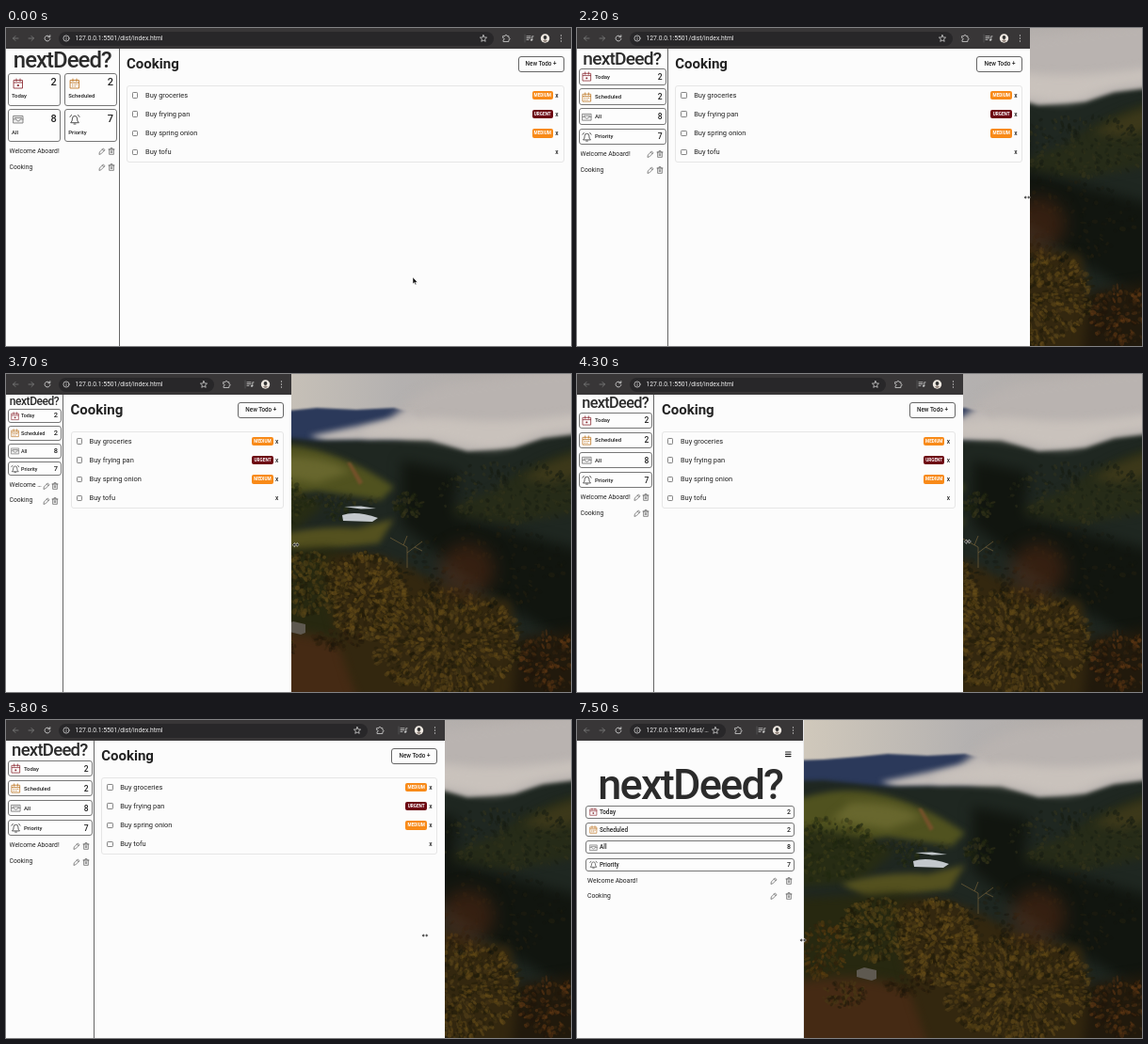
Animation, 600 px wide and 338 px high, one loop 7600 ms. Source, as an HTML page with a canvas:

```html
<!DOCTYPE html>
<html lang="en">
<head>
<meta charset="utf-8">
<title>Todo layout resize</title>
<style>
html, body { margin: 0; width: 100%; height: 100%; overflow: hidden; background: #15180f; }
#stage { position: relative; width: 600px; height: 338px; overflow: hidden; font-family: Roboto, "Liberation Sans", sans-serif; color: #222; }
#stage * { box-sizing: border-box; }
#wall, #win, #bar, #side, #main { position: absolute; left: 0; top: 0; }
svg { display: block; fill: none; stroke: currentColor; stroke-linecap: round; stroke-linejoin: round; overflow: visible; }

#win { width: var(--w); height: 338px; overflow: hidden; background: #fcfcfc; }
#gap { position: absolute; top: 0; left: var(--w); height: 338px; background: #e9e9ea; }
#bar { width: 100%; height: 22px; background: #383637; color: #d0d0d0; }
#bar svg { position: absolute; top: 0; }
#pill { position: absolute; left: 56px; right: 82px; top: 4px; height: 14.5px; border-radius: 8px; background: #282729; }
#url { position: absolute; left: 17.5px; right: 18px; top: 0; font: 6.75px/14px Roboto, sans-serif; color: #eee; }
.cut { white-space: nowrap; overflow: hidden; text-overflow: ellipsis; }

#side { top: 22px; width: calc(var(--s) + .5px); height: 316px; border-right: 1px solid #666; }
#logo { position: relative; height: calc(var(--s) * .19 + 3px); }
#logo span { position: absolute; left: 0; right: 0; bottom: 1px; text-align: center; white-space: nowrap; font-weight: 500; font-size: calc(var(--s) * .199); line-height: 1; letter-spacing: -.04em; color: #2b2b2b; }
#cards { display: grid; gap: 3.6px; grid-auto-rows: 17.5px; margin: 0 1px 1.75px 1.5px; }
.card { position: relative; border: 1px solid #777; border-radius: 3px; background: #fdfdfd; }
.card > * { position: absolute; }
.card svg { left: 2.5px; top: 2.2px; width: 11px; height: 11px; }
.card b { left: 16.5px; top: 2.8px; font: 500 6px/10px Roboto, sans-serif; }
.card i { right: 3px; top: 2.8px; font: 500 8.5px/10px Roboto, sans-serif; }
.row { position: relative; height: 17px; font-size: 6.75px; line-height: 17px; }
.row span { position: absolute; left: 3.5px; width: calc(var(--s) - 26px); }
.row svg { position: absolute; top: 4.4px; width: 8px; height: 8px; }
.row .pen { left: calc(var(--s) - 22px); }
.row .bin { left: calc(var(--s) - 12.5px); }

.grid #cards { grid-template-columns: 1fr 1fr; grid-auto-rows: 34.8px; gap: 3.9px; margin-right: 1.5px; }
.grid .card svg { left: 4.5px; top: 4px; width: 12px; height: 12px; }
.grid .card b { left: 3.5px; top: 18.5px; }
.grid .card i { top: 4.6px; font-size: 11px; }
.small #cards { grid-auto-rows: 15.5px; gap: 3.3px; }
.small .card svg { width: 9.5px; height: 9.5px; top: 2px; }
.small .card b { left: 13.5px; top: 1.8px; font-size: 5.4px; }
.small .card i { top: 1.8px; font-size: 7.5px; }
.small .row, .narrow .row { height: 16px; line-height: 16px; }

#menu, .narrow #main { display: none; }
.narrow #menu { display: block; position: absolute; right: 13px; top: 33px; width: 6.5px; height: 6.5px; }
.narrow #side { border: 0; }
.narrow #logo { height: calc(var(--s) * .19 + 22.9px); }
.narrow #logo span { bottom: -1px; font-size: calc((var(--s) - 44px) / 4.35); }
.narrow #cards { grid-auto-rows: 14.6px; gap: 4.1px; margin: 0 9.5px 1.75px 9px; }
.narrow .card svg { width: 9px; height: 9px; top: 1.8px; }
.narrow .card b { left: 14px; top: 1.4px; font-size: 6.4px; }
.narrow .card i { top: 1.4px; font-size: 7px; }
.narrow .row span { left: 11px; width: auto; }
.narrow .row svg { top: 4px; }
.narrow .row .pen { left: calc(var(--s) - 35px); }
.narrow .row .bin { left: calc(var(--s) - 19.3px); }

#main { left: calc(var(--s) + 8px); top: 22px; width: calc(var(--w) - var(--s) - 15.5px); }
h1 { position: absolute; margin: 0; left: 0; top: 6px; font: 700 15px/20px Roboto, sans-serif; }
#new { position: absolute; right: 0; top: 8px; width: 49px; height: 16.5px; border: 1px solid #666; border-radius: 3px; font: 500 6.3px/14.5px Roboto, sans-serif; text-align: center; white-space: nowrap; }
#list { position: absolute; left: 0; right: 0; top: 38.5px; height: 82px; border: 1px solid #e6e6e6; border-radius: 3px; }
.todo { position: relative; height: 20.2px; font-size: 7.47px; line-height: 20px; white-space: nowrap; }
.todo > * { position: absolute; }
.todo s { left: 5px; top: 6.8px; width: 6.4px; height: 6.4px; border: .8px solid #858585; border-radius: 1.2px; background: #fff; }
.todo span { left: 19px; }
.todo em { right: 10.5px; top: 5.2px; width: 22.5px; height: 9.6px; border-radius: 2px; background: #f88a18; color: #fff; font: 700 4.7px/9.8px Roboto, sans-serif; text-align: center; }
.todo em.urgent { background: #6d0812; }
.todo u { right: 5px; font-size: 6.6px; font-weight: 500; text-decoration: none; }
#hand { position: absolute; left: 0; top: 0; }
</style>
</head>
<body>
<svg width="0" height="0" style="position:absolute">
  <symbol id="cal" viewBox="0 0 24 24"><path d="M3 5h18v17H3zM3 10h18M8 2v5M16 2v5"/></symbol>
  <symbol id="today" viewBox="0 0 24 24"><use href="#cal"/><path d="M11 15h2v2h-2z" fill="currentColor"/></symbol>
  <symbol id="plan" viewBox="0 0 24 24"><use href="#cal"/><path d="M7 14h1M12 14h1M16 14h1M7 18h1M12 18h1"/></symbol>
  <symbol id="all" viewBox="0 0 24 24"><path d="M2 5h20v15H2zM5 9h14M2 12h6q1 4 4 4t4-4h6" fill="#eee"/></symbol>
  <symbol id="bell" viewBox="0 0 24 24"><path d="M4 19q3-2 3-9 0-5 5-5t5 5q0 7 3 9zM10 22h4M2 7l3-4M22 7l-3-4"/></symbol>
  <symbol id="pen" viewBox="0 0 24 24"><path d="M3 21l1-6L16 3l5 5L9 20zM13 6l5 5"/></symbol>
  <symbol id="bin" viewBox="0 0 24 24"><path d="M3 6h18M5 6v16h14V6M9 6V2h6v4M10 11v6M14 11v6"/></symbol>
</svg>
<div id="stage">
  <canvas id="wall" width="600" height="338"></canvas>
  <div id="gap"></div>
  <div id="win">
    <div id="side">
      <div id="logo"><span>nextDeed?</span></div>
      <div id="cards"></div>
      <div id="rows"></div>
    </div>
    <div id="main">
      <h1>Cooking</h1>
      <div id="new">New Todo +</div>
      <div id="list"></div>
    </div>
    <svg id="menu" viewBox="0 0 6.5 6.5" stroke-width="1.2"><path d="M.5 1h5.5M.5 3.3h5.5M.5 5.6h5.5"/></svg>
    <div id="bar">
      <svg width="56" height="22" style="left:0" stroke-width=".9">
        <path d="M13 11H7.5M10 8.5 7.5 11 10 13.5M24 11h5.5M27 8.5l2.5 2.5-2.5 2.5" stroke="#777"/>
        <path d="M46.3 9.2A2.9 2.9 0 1 0 46.9 11.5M46.8 7.7v2h-2"/>
      </svg>
      <div id="pill"><div id="url" class="cut">127.0.0.1:5501/dist/index.html</div></div>
      <svg width="10" height="22" style="left:59px" stroke-width=".8"><circle cx="5" cy="11" r="3.1"/><path d="M5 10.8v1.7M5 9.3v.1"/></svg>
      <svg width="100" height="22" style="right:0" stroke-width=".8">
        <path d="M7 7.5l1 2.4 2.6.2-2 1.7.6 2.5L7 13l-2.2 1.3.6-2.5-2-1.7L6 9.9z"/>
        <path d="M28 8.6h2q0-1.4 1-1.4t1 1.4h1.9v2q1.2 0 1.2 1t-1.2 1V14.5H28v-1.8q1.2 0 1.2-1.1T28 10.5z"/>
        <path d="M51 7v8" stroke="#5a5a5a"/>
        <path d="M53 8.8h4M53 10.6h4M53 12.4h2M58.8 12.6V8.8h1.2"/>
        <circle cx="58" cy="12.7" r=".7" fill="currentColor"/>
        <g stroke="none"><circle cx="72.5" cy="11" r="4.7" fill="#efe9e2"/><circle cx="72.5" cy="10" r="1.9" fill="#333"/><path d="M70 13.8q2.5-3 5 0-2.5 2.2-5 0z" fill="#8d8078"/></g>
        <path d="M89.5 8v0M89.5 11v0M89.5 14v0" stroke-width="1.3"/>
      </svg>
    </div>
  </div>
  <svg id="hand" width="1" height="1">
    <path id="arrow" d="M0-3v7l1.6-1.4 1.1 2.5 1.1-.5-1.1-2.4h2.2z" fill="#111" stroke="#fff" stroke-width=".5"/>
    <path id="grip" d="M-3.4 0l2.2-2v1.4h2.4V-2L3.4 0 1.2 2V.6h-2.4V2z" fill="#111" stroke="#fff" stroke-width=".5"/>
  </svg>
</div>
<script>
const $ = id => document.getElementById(id);
const icon = (id, cls = '', color = '#333') =>
  `<svg class="${cls}" style="color:${color}" stroke-width="1.7"><use href="#${id}"/></svg>`;

$('cards').innerHTML = [
  ['today', '#8a2830', 'Today', 2], ['plan', '#bd7420', 'Scheduled', 2],
  ['all', '#777', 'All', 8], ['bell', '#333', 'Priority', 7]
].map(([id, color, name, n]) =>
  `<div class="card">${icon(id, '', color)}<b>${name}</b><i>${n}</i></div>`).join('');

$('rows').innerHTML = ['Welcome Aboard!', 'Cooking'].map(name =>
  `<div class="row"><span class="cut">${name}</span>${icon('pen', 'pen')}${icon('bin', 'bin')}</div>`).join('');

$('list').innerHTML = [
  ['groceries', 'medium'], ['frying pan', 'urgent'], ['spring onion', 'medium'], ['tofu']
].map(([name, tag]) => `<div class="todo"><s></s><span>Buy ${name}</span>${
  tag ? `<em class="${tag}">${tag.toUpperCase()}</em>` : ''}<u>x</u></div>`).join('');

// Soft landscape backdrop
const ctx = $('wall').getContext('2d');
let seed = 7;
const rnd = () => (seed = seed * 16807 % 2147483647) / 2147483647;

function shape(color, blur, d) {
  ctx.filter = blur ? `blur(${blur}px)` : 'none';
  ctx.fillStyle = color;
  ctx.fill(new Path2D(d));
}

// Dabs of leaf colour inside an ellipse
function leaves(cx, cy, rx, ry, n, size, colors) {
  ctx.filter = 'none';
  for (let i = 0; i < n; i++) {
    const a = rnd() * 6.283, r = Math.sqrt(rnd());
    ctx.fillStyle = colors[i % colors.length];
    ctx.globalAlpha = .25 + rnd() * .35;
    ctx.beginPath();
    ctx.ellipse(cx + Math.cos(a) * r * rx, cy + Math.sin(a) * r * ry,
      size * (.5 + rnd()), size * (.4 + rnd() * .7), a, 0, 6.283);
    ctx.fill();
  }
  ctx.globalAlpha = 1;
}

function paintWall() {
  const sky = ctx.createLinearGradient(230, 0, 600, 40);
  sky.addColorStop(0, '#d2cabc');
  sky.addColorStop(.5, '#b4b1b0');
  sky.addColorStop(1, '#b3aba5');
  ctx.fillStyle = sky;
  ctx.fillRect(0, 0, 600, 100);
  shape('#2b395a', 1, 'M200 44L262 42 300 39 330 36 372 38 412 36 470 52V100H200z');
  shape('#b9b3b0', 6, 'M412 48Q424 22 470 10L620-10V90H430z');
  shape('#bfb9b6', 3, 'M322 66Q360 58 388 52T430 38L450 72H340z');
  shape('#1f2721', 2, 'M190 66L262 64 330 71 400 70 450 70 490 82 540 78 570 68 620 62V360H190z');
  shape('#c9c2bc', 5, 'M380 60Q430 42 480 48T610 42V58Q570 60 545 72T480 74 380 66z');
  shape('#262b18', 4, 'M610 78Q555 92 518 124L450 150 530 160 610 146z');
  shape('#3c381a', 5, 'M610 84Q575 92 548 112L580 116 610 108z');
  shape('#11150f', 7, 'M420 92L480 104 475 150 620 190V300L520 240 420 160z');
  shape('#50521f', 3, 'M215 92Q270 68 318 78T412 120L398 134 330 124 215 142z');
  shape('#68672e', 4, 'M290 88Q340 86 366 104L330 116 270 106z');
  shape('#74512a', 1, 'M362 94l4 0 13 21-4 3z');
  shape('#272c14', 4, 'M215 114Q300 116 338 140L300 172 215 180z');
  shape('#54511f', 3, 'M280 174Q330 160 372 164L412 154 396 180 310 190z');
  shape('#272810', 5, 'M215 190L340 184 400 198V300H215z');
  shape('#452a14', 6, 'M190 286Q290 262 348 284T410 360H190z');
  shape('#33270f', 5, 'M340 196Q385 180 432 208T535 240L560 360H380Q340 270 340 196z');
  shape('#21190c', 6, 'M545 280L620 268V360H535z');

  leaves(268, 138, 52, 34, 260, 2.4, ['#20280f', '#424018', '#1a2110']);
  leaves(350, 146, 12, 11, 40, 2.2, ['#1c2410', '#2c3216']);
  leaves(427, 140, 16, 14, 70, 2.4, ['#1b210f', '#37361a']);
  leaves(340, 134, 60, 6, 70, 2, ['#1f2510', '#38381a']);
  shape('#c3c8cc', .4, 'M357 150Q372 145 395 153L389 157 358 156zM359 141l18-.5 16 2.5-16 .5z');
  leaves(262, 245, 24, 32, 180, 2.4, ['#62400f', '#33240c', '#4b3512']);
  leaves(320, 222, 42, 34, 420, 2.4, ['#4d3d15', '#1f1c0a', '#5c4818']);
  leaves(382, 235, 44, 46, 620, 2.4, ['#59451a', '#211b09', '#6a5019']);
  leaves(468, 284, 82, 56, 1100, 2.4, ['#57431a', '#1e1a09', '#654c18']);
  leaves(578, 306, 34, 32, 240, 2.4, ['#643a15', '#21160a', '#40290f']);
  leaves(535, 125, 78, 34, 260, 2.2, ['#171c12', '#32321a']);
  leaves(505, 205, 90, 45, 200, 2.4, ['#12150e', '#221f10']);
  leaves(285, 292, 24, 14, 110, 2.2, ['#493a15', '#1f190a']);
  leaves(352, 282, 26, 12, 80, 2.4, ['#1f170a', '#33230e']);
  shape('#5e5950', .4, 'M297 266l8-3 13 3v9l-5 2-16-4z');
  shape('#6b301466', 9, 'M490 180a29 28 0 1 1 0 56a29 28 0 1 1 0-56z');
  ctx.filter = 'none';
  ctx.strokeStyle = '#75603a';
  ctx.lineWidth = .7;
  ctx.stroke(new Path2D('M426 206V184L408 174M426 190L442 178M422 182L426 172M434 184L442 188'));
}
paintWall();

// time, window width, pointer x, pointer y
const track = [
  [0, 600, 432, 268], [200, 600, 598, 168], [500, 600, 598, 168], [1200, 600, 598, 162],
  [1700, 556, 554, 170], [2200, 481, 478, 180], [2500, 380, 374, 187], [2900, 244, 240, 191],
  [3200, 232, 231, 187], [3600, 285, 290, 182], [4300, 409.5, 415, 178], [4800, 515, 519, 192],
  [5200, 548, 546, 208], [5500, 532, 515, 222], [5800, 466, 445, 229], [6100, 402, 392, 231],
  [6400, 346.5, 347, 232], [6800, 313, 312, 233], [7100, 268, 267, 233], [7500, 240, 240, 234]
];

function pose(t) {
  const i = track.findIndex(k => k[0] >= t);
  if (i < 1) return track[0].slice(1);
  const a = track[i - 1], b = track[i], p = (t - a[0]) / (b[0] - a[0]);
  return [1, 2, 3].map(n => a[n] + (b[n] - a[n]) * p);
}

function draw(t) {
  const [w, x, y] = pose(t);
  const narrow = w < 300;
  const lag = narrow ? Math.max(0, (pose(t - 100)[0] - w) * .18) : 0;
  const stage = $('stage');
  stage.className = narrow ? 'narrow' : w < 360 ? 'small' : w < 530 ? '' : 'grid';
  stage.style.setProperty('--w', w + 'px');
  stage.style.setProperty('--s', (narrow ? w : w / 5) + 'px');
  $('gap').style.width = lag + 'px';
  $('hand').style.transform = `translate(${x}px, ${y}px)`;
  $('arrow').style.display = t < 200 ? '' : 'none';
  $('grip').style.display = t < 200 ? 'none' : '';
}

const start = performance.now();
function tick() {
  const t = (performance.now() - start) % 7600;
  draw(Math.floor(t / 100) * 100);
  requestAnimationFrame(tick);
}
tick();
</script>
</body>
</html>
```
